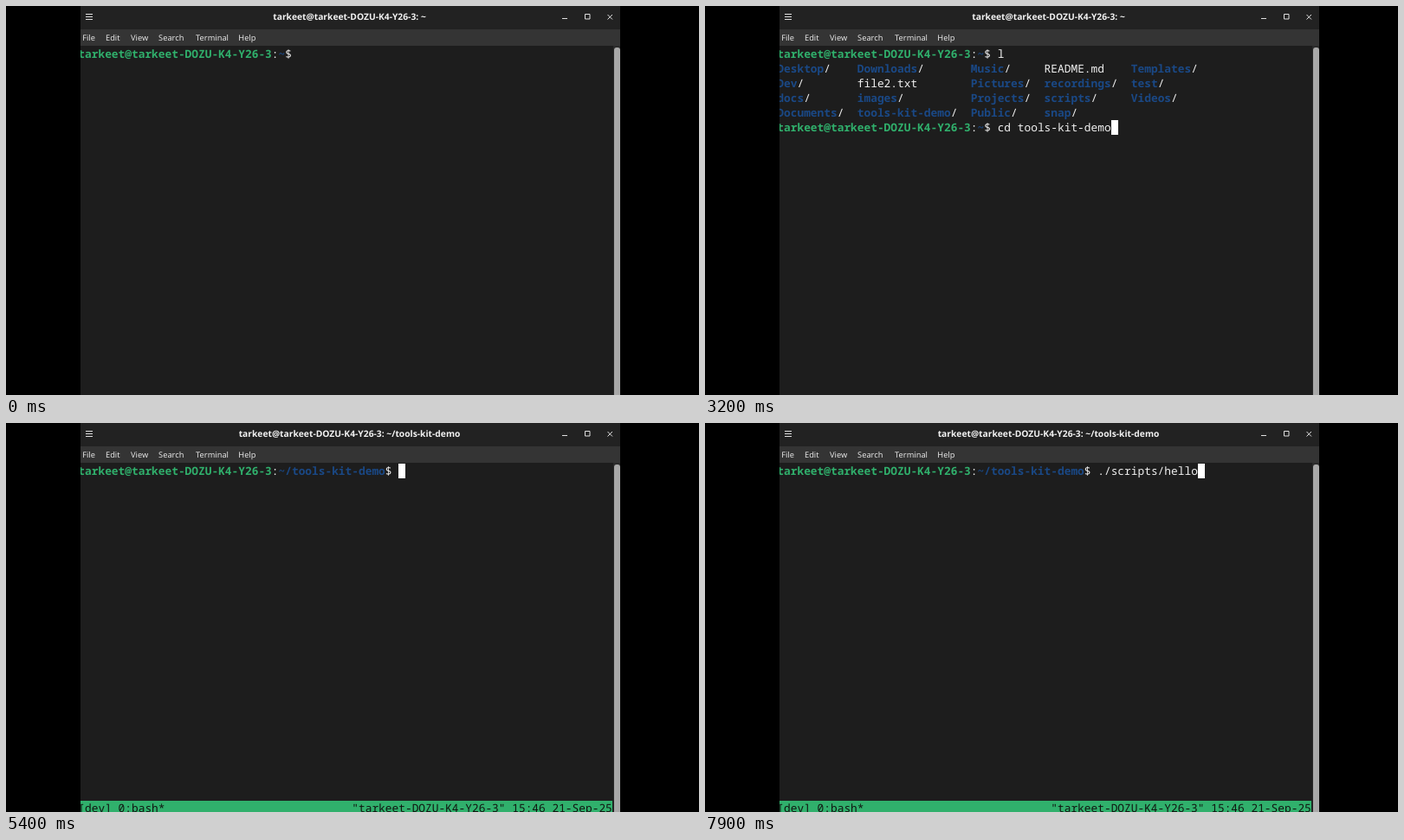
Write an HTML page that moves like this. It is 800x450 px and loops after 8 s.

```html
<!DOCTYPE html>
<html lang="en">
<head>
<meta charset="utf-8">
<title>Terminal session</title>
<style>
  html, body { margin: 0; width: 100%; height: 100%; overflow: hidden; background: #000; }
  #stage { position: relative; width: 800px; height: 450px; overflow: hidden; background: #000; text-rendering: geometricPrecision; }
  #win { position: absolute; left: 86px; top: 0; width: 623px; height: 450px; overflow: hidden; background: #1d1d1d; }
  #bar, #menu { position: absolute; left: 0; width: 100%; white-space: pre; font-family: "Noto Sans", sans-serif; }
  #bar { top: 0; height: 27px; background: #222; }
  #title { position: absolute; left: 0; width: 621px; text-align: center; color: #f2f2f2; font-weight: 700; font-size: 10.28px; line-height: 26px; }
  #menu { top: 27px; height: 19px; background: #343434; color: #e4e4e4; font-size: 9.25px; line-height: 19px; }
  #menu span { position: absolute; }
  #icons { position: absolute; left: 0; top: 0; fill: none; stroke: #e0e0e0; }
  #track { position: absolute; left: 615px; top: 46px; width: 8px; height: 404px; background: #2a2a2a; }
  #thumb { position: absolute; left: 616px; top: 48px; width: 7px; height: 420px; border-radius: 3px; background: #a8a8a8; }
  #term { position: absolute; left: -2.7px; top: 47.4px; font: 12.85px/16.96px "Noto Sans Mono", monospace; color: #f0f0f0; white-space: pre; }
  .row { position: absolute; left: 0; height: 16.96px; }
  #term b { font-weight: 700; }
  .g { color: #30b06c; }
  .d { color: #1a4885; }
  #cursor { position: absolute; width: 7.71px; height: 16.96px; background: #fff; }
  #status { width: 617px; background: #30b06c; color: #101510; }
</style>
</head>
<body>
<div id="stage">
  <div id="win">
    <div id="bar"><div id="title"></div></div>
    <div id="menu"></div>
    <svg id="icons" width="623" height="27">
      <path d="M6 9.5h8M6 12.5h8M6 15.5h8M556 14.5h6M582.5 9.5h5.5v5.5h-5.5zM608.5 10l5.5 5.5M614 10l-5.5 5.5"/>
    </svg>
    <div id="term"></div>
    <div id="track"></div>
    <div id="thumb"></div>
  </div>
</div>
<script>
const LOOP = 8000, CELL_W = 7.71, CELL_H = 16.96;
const USER = 'tarkeet', HOST = 'tarkeet-DOZU-K4-Y26-3', DIR = 'tools-kit-demo';
const WHO = `${USER}@${HOST}`;

const CURSOR_ON = 80, LIST_AT = 470, CD_AT = 3270, ENTER_AT = 4970, MUX_AT = 5070, PROMPT_AT = 5270;

// Key press times for each command
const listCmd = { text: 'l', at: [270] };
const cdCmd = {
  text: 'cd ' + DIR,
  at: [740, 870, 1030, 1170, 1280, 1470, 1580, 1770, 1880, 2070, 2220, 2370, 2480, 2640, 2770, 2880, 2990]
};
const muxCmd = {
  text: 'tmux new -s dev',
  at: [3470, 3590, 3720, 3850, 3970, 4170, ...Array.from({ length: 9 }, (_, i) => 4270 + i * 80)]
};
const runCmd = {
  text: './scripts/hello',
  at: [5690, 5830, 5980, 6120, 6270, 6370, 6470, 6670, 6870, 6970, 7070, 7270, 7380, 7530, 7670]
};

const listing = [
  ['Desktop/', 'Downloads/', 'Music/', 'README.md', 'Templates/'],
  ['Dev/', 'file2.txt', 'Pictures/', 'recordings/', 'test/'],
  ['docs/', 'images/', 'Projects/', 'scripts/', 'Videos/'],
  ['Documents/', DIR + '/', 'Public/', 'snap/']
];
const listWidths = [12, 17, 11, 13, 12];

const $ = id => document.getElementById(id);
const typed = (cmd, t) => cmd.text.slice(0, cmd.at.filter(k => k <= t).length);
const prompt = path => `<b class="g">${WHO}</b>:<b class="d">${path}</b>$ `;

function entry(name, i) {
  const pad = ' '.repeat(listWidths[i] - name.length);
  return (name.endsWith('/') ? `<b class="d">${name.slice(0, -1)}</b>/` : name) + pad;
}

const listRows = listing.map(names => names.map(entry).join(''));
const statusLeft = '[dev] 0:bash*';
const statusRight = `"${HOST}" 15:46 21-Sep-25`;
const statusText = statusLeft + statusRight.padStart(80 - statusLeft.length);

function screen(t) {
  const rows = [];
  let col = 0;
  const ask = (path, cmd) => {
    const text = typed(cmd, t);
    rows.push(prompt(path) + text);
    col = WHO.length + path.length + 3 + text.length;
  };

  if (t >= MUX_AT) {
    if (t >= PROMPT_AT) ask('~/' + DIR, runCmd);
    return { rows, col, line: 0, mux: true };
  }
  ask('~', listCmd);
  if (t >= LIST_AT) {
    rows.push(...listRows);
    ask('~', cdCmd);
  }
  if (t >= CD_AT) ask('~/' + DIR, muxCmd);
  if (t >= ENTER_AT) {
    rows.push('');
    col = 0;
  }
  return { rows, col, line: rows.length - 1, mux: false };
}

const rowHtml = (html, i, id = '') =>
  `<div class="row" ${id} style="top:${(i * CELL_H).toFixed(2)}px">${html}</div>`;

let shown = '';
function draw(t) {
  const s = screen(t);
  let html = s.rows.map((r, i) => rowHtml(r, i)).join('');
  if (s.mux) html += rowHtml(statusText, 23, 'id="status"');
  if (t >= CURSOR_ON) {
    html += `<div id="cursor" style="left:${(s.col * CELL_W).toFixed(2)}px;top:${(s.line * CELL_H).toFixed(2)}px"></div>`;
  }
  if (html !== shown) {
    $('term').innerHTML = shown = html;
    $('title').textContent = `${WHO}: ~${t >= CD_AT ? '/' + DIR : ''}`;
  }
}

const menu = { File: 2.2, Edit: 29, View: 58, Search: 90.1, Terminal: 133.1, Help: 182.3 };
$('menu').innerHTML = Object.entries(menu)
  .map(([name, x]) => `<span style="left:${x}px">${name}</span>`).join('');

const start = performance.now();
function tick() {
  draw((performance.now() - start) % LOOP);
  requestAnimationFrame(tick);
}
tick();
</script>
</body>
</html>
```
